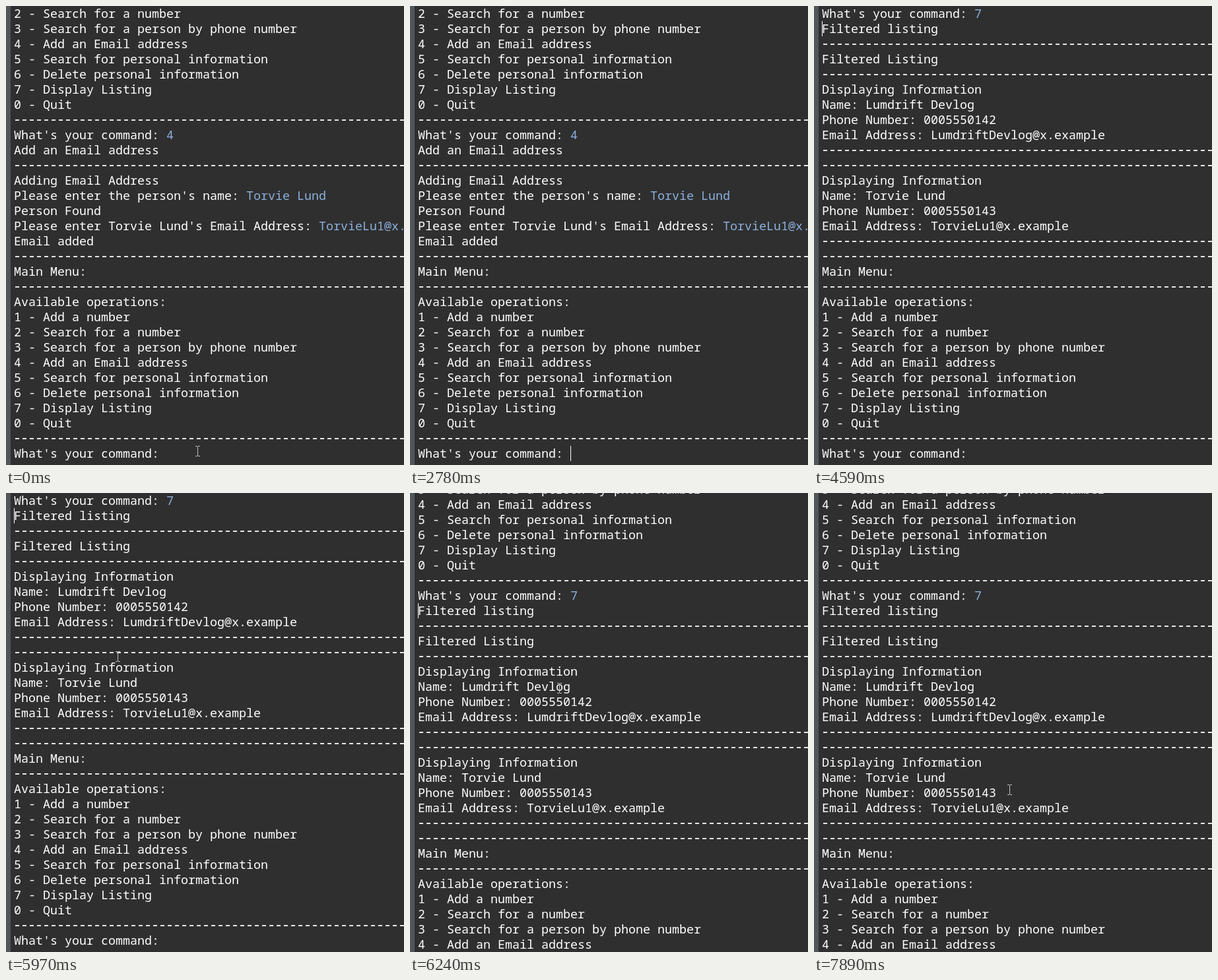
Animation of 603x696 px, one loop 8 s. Source, as an HTML page with a canvas:

```html
<!DOCTYPE html>
<html lang="en">
<head>
<meta charset="utf-8">
<title>Console phone book</title>
<style>
  html, body { margin: 0; width: 100%; height: 100%; overflow: hidden; background: #2f2f2f; }
  canvas { display: block; }
</style>
</head>
<body>
<canvas id="stage" width="603" height="696"></canvas>
<script>
const ctx = document.getElementById('stage').getContext('2d');
const W = 603, H = 696, LOOP = 8000;
const LEFT = 12, CELL = 11, LINE = 23, BASELINE = 18;
const BG = '#2f2f2f', SASH = '#515658', TEXT = '#ffffff', INPUT = '#8cb0de';
const FONT = '500 18.3333px "Noto Sans Mono", "DejaVu Sans Mono", monospace';

const RULE = '---';
const PROMPT = "What's your command: ";
const PERSON = 'Torvie Lund', MAIL = 'TorvieLu1@x.example';

const operations = [
  '1 - Add a number',
  '2 - Search for a number',
  '3 - Search for a person by phone number',
  '4 - Add an Email address',
  '5 - Search for personal information',
  '6 - Delete personal information',
  '7 - Display Listing',
  '0 - Quit'
];
const menu = [RULE, 'Main Menu:', RULE, 'Available operations:', ...operations, RULE];
const entry = (name, phone, mail) => [
  RULE, 'Displaying Information', 'Name: ' + name,
  'Phone Number: ' + phone, 'Email Address: ' + mail, RULE
];

// A line is a string, or [output, user input].
const before = [
  ...operations.slice(1), RULE,
  [PROMPT, '4'], 'Add an Email address', RULE,
  'Adding Email Address',
  ["Please enter the person's name: ", PERSON],
  'Person Found',
  [`Please enter ${PERSON}'s Email Address: `, MAIL],
  'Email added',
  ...menu
];
const promptRow = before.length;
const after = [
  'Filtered listing', RULE, 'Filtered Listing',
  ...entry('Lumdrift Devlog', '0005550142', 'LumdriftDevlog@x.example'),
  ...entry(PERSON, '0005550143', MAIL),
  ...menu, PROMPT
];

// Each action changes part of the state and restarts the caret blink.
const BLINK = 530;
const bottom = promptRow * LINE;
const actions = [
  { at: 280 },
  { at: 2100 },
  { at: 2660, input: '7' },
  { at: 2780, input: '' },
  { at: 3740, input: '7' },
  { at: 4590, sent: true, scroll: bottom },
  { at: 6090, scroll: bottom - 75 },
  { at: 6240, scroll: bottom - 144, at: 6090 + 150 }
].map(({ at, ...change }) => ({ at, change }));

function stateAt(t) {
  const state = { input: '', sent: false, scroll: 0, caret: false };
  for (const { at, change } of actions) {
    if (at > t) break;
    Object.assign(state, change);
    state.caret = Math.floor((t - at) / BLINK) % 2 === 0;
  }
  return state;
}

// The pointer rests, hides while typing, then moves in even ticks through [tick, x, y].
const HIDE = 2100, SHOW = 5680, TICK = 136;
const path = [
  [0, 314, 495], [2, 169, 248], [3, 226, 296], [5, 226, 296], [7, 354, 340],
  [10, 135, 302], [11, 235, 355], [12, 136, 350], [15, 136, 468], [16, 296, 450]
];

function pointerAt(t) {
  if (t < HIDE) return [290, 675];
  if (t < SHOW) return null;
  const tick = Math.floor((t - SHOW) / TICK);
  const next = path.findIndex(p => p[0] > tick);
  if (next < 0) return path[path.length - 1].slice(1);
  const a = path[next - 1], b = path[next];
  const k = (tick - a[0]) / (b[0] - a[0]);
  return [1, 2].map(i => Math.round(a[i] + (b[i] - a[i]) * k));
}

function rect(color, x, y, w, h) {
  ctx.fillStyle = color;
  ctx.fillRect(x, y, w, h);
}

function write(text, col, y, color) {
  ctx.fillStyle = color;
  ctx.fillText(text, LEFT + col * CELL, y + BASELINE);
}

function drawLine(line, y) {
  if (line === RULE) {
    for (let x = LEFT; x < W; x += CELL) rect('#e6e6e6', x + 2, y + 11, 6, 2);
    return;
  }
  const [output, input = ''] = [].concat(line);
  write(output, 0, y, TEXT);
  write(input, output.length, y, INPUT);
}

function drawPointer(x, y) {
  const color = '#c4c4c4';
  rect(color, x, y - 7, 1, 14);
  for (const edge of [y - 8, y + 7]) {
    rect(color, x - 3, edge, 3, 1);
    rect(color, x + 1, edge, 3, 1);
  }
}

function draw(t) {
  const { input, sent, scroll, caret } = stateAt(t);
  const lines = [...before, [PROMPT, input], ...(sent ? after : [])];

  rect(BG, 0, 0, W, H);
  rect(SASH, 0, 0, 7, H);

  ctx.font = FONT;
  lines.forEach((line, row) => {
    const y = row * LINE - scroll;
    if (y > -LINE && y < H) drawLine(line, y);
  });

  if (caret) {
    const col = sent ? 0 : PROMPT.length + input.length;
    const row = promptRow + (sent ? 1 : 0);
    rect(TEXT, LEFT + col * CELL, row * LINE - scroll, 1, LINE);
  }

  const pointer = pointerAt(t);
  if (pointer) drawPointer(...pointer);
}

const start = performance.now();
function frame() {
  draw((performance.now() - start) % LOOP);
  requestAnimationFrame(frame);
}
frame();
</script>
</body>
</html>
```
